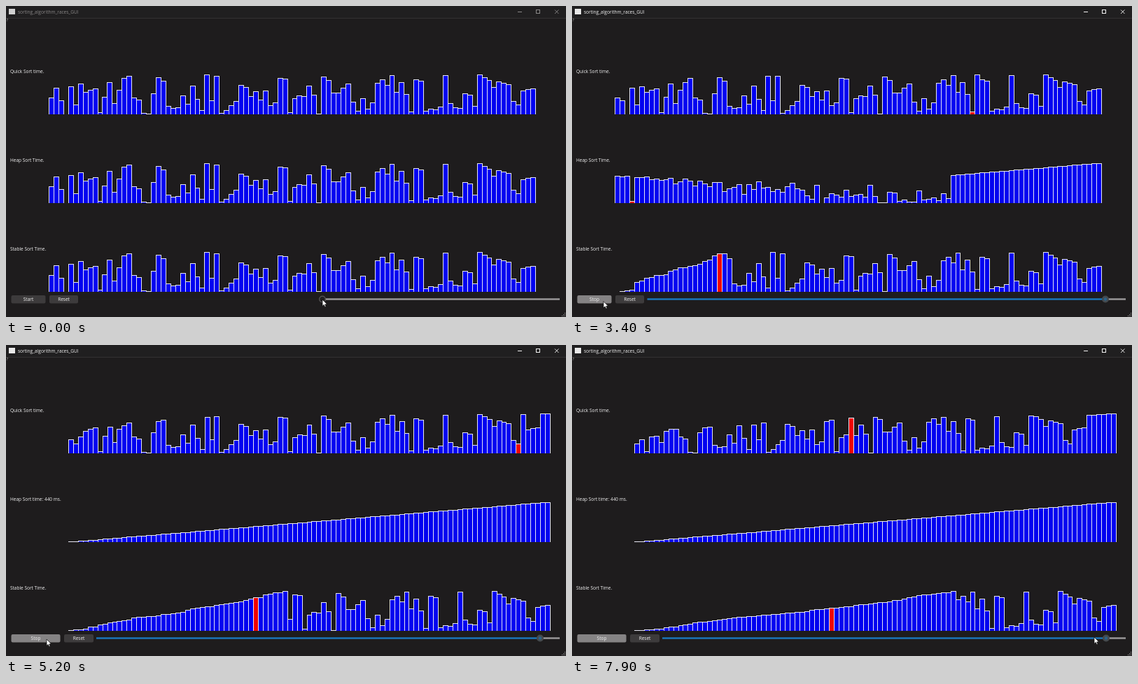
These frames come from a looping animation (800x445 px, 8 s). An HTML page with a canvas:

```html
<!DOCTYPE html>
<html lang="en">
<head>
<meta charset="utf-8">
<title>sorting_algorithm_races_GUI</title>
<style>
html, body { margin: 0; width: 100%; height: 100%; overflow: hidden; background: #1e1c1d; }
canvas { display: block; }
</style>
</head>
<body>
<canvas id="stage" width="800" height="445"></canvas>
<script>
const ctx = document.getElementById('stage').getContext('2d');
const LOOP = 8000, TICK = 100, PITCH = 6.95, UNIT = 0.58;
const START = 2800, HEAP_END = 4150, RELAYOUT = 4300;
const FONT = '6.5px "Open Sans", "Noto Sans", sans-serif';

// Rough bar heights; their ranks give a permutation of 0..99.
const rough = [
  24, 39, 20, 0, 40, 14, 45, 33, 35, 37, 3, 26, 47, 16, 35.5, 52, 55, 25, 21, 2,
  1, 31, 54, 48, 12, 9, 10, 28, 15, 41, 22, 6, 57.5, 20, 55, 1.5, 6, 12, 19, 43,
  39.5, 26, 33, 21.5, 34, 13, 17, 52, 51, 3.5, 23, 28, 27, 41, 29, .5, 54, 49, 31, 32,
  38, 44, 18, 5, 22.5, 8, 17, 45, 50, 42, 56, 32, 46.5, 30, 4, 50.5, 48, 5, 7, 6,
  11, 56, 16, 9, 8, 30, 29, 11, 57, 52, 49.5, 39, 47, 46, 43.5, 19, 14.5, 34.5, 36.5, 37.5
];
const N = rough.length;
const values = [];
rough.map((h, i) => [h, i]).sort((p, q) => p[0] - q[0]).forEach((p, rank) => { values[p[1]] = rank; });

function swap(a, i, j) { [a[i], a[j]] = [a[j], a[i]]; }

function bubbleSteps() {
  const a = values.slice(), out = [];
  for (let end = N - 1; end > N - 10; end--) {
    for (let j = 0; j < end; j++) {
      out.push({ a: a.slice(), red: j });
      if (a[j] > a[j + 1]) swap(a, j, j + 1);
      out.push({ a: a.slice(), red: j });
    }
  }
  return out;
}

function insertionSteps() {
  const a = values.slice(), out = [];
  for (let i = 1; i < N; i++) {
    const v = a[i];
    let j = i - 1;
    for (; j >= 0 && a[j] > v; j--) {
      a[j + 1] = a[j];
      out.push({ a: a.slice(), red: j, i });
    }
    a[j + 1] = v;
    out.push({ a: a.slice(), red: j + 1, i });
  }
  return out;
}

function heapSteps() {
  const a = values.slice(), out = [];
  const exchange = (i, j) => { swap(a, i, j); out.push({ a: a.slice(), red: j }); };
  function sift(root, size) {
    for (;;) {
      let child = 2 * root + 1;
      if (child >= size) return;
      if (child + 1 < size && a[child + 1] > a[child]) child++;
      if (a[root] >= a[child]) return;
      exchange(root, child);
      root = child;
    }
  }
  for (let i = N / 2 - 1; i >= 0; i--) sift(i, N);
  for (let end = N - 1; end > 0; end--) { exchange(0, end); sift(0, end); }
  return out;
}

const bubble = bubbleSteps(), insertion = insertionSteps(), heap = heapSteps();
const idle = { a: values, red: -1 };
const sorted = { a: values.map((v, i) => i), red: -1 };
const at = (i, j) => insertion.findIndex(s => s.i === i && s.red === j);

const bubblePath = [[START, 0], [4200, 344], [5200, 581], [6300, 859], [7900, 1248]];
const insertPath = [[START, 0], [4200, at(35, 32)], [5200, at(45, 39)], [6300, at(55, 37)], [7900, at(66, 41)]];
const heapPath = [[START, 0], [HEAP_END, heap.length - 1]];
const sliderPath = [[200, 452], [1300, 762]];
const mouseX = [[0, 452], [200, 453], [1300, 761], [1600, 761], [2500, 43], [2800, 43], [4200, 48], [5200, 58], [5400, 64], [6200, 784], [6500, 784], [7500, 746]];
const mouseY = [[0, 420], [200, 420], [1300, 426], [1600, 426], [2500, 423], [2800, 423], [4200, 422], [5200, 421], [5400, 422], [6200, 425], [6500, 425], [7500, 418]];

function track(path, t, ease) {
  if (t <= path[0][0]) return path[0][1];
  for (let k = 1; k < path.length; k++) {
    const [t0, v0] = path[k - 1], [t1, v1] = path[k];
    if (t <= t1) {
      let u = (t - t0) / (t1 - t0);
      if (ease) u = u * u * (3 - 2 * u);
      return v0 + (v1 - v0) * u;
    }
  }
  return path[path.length - 1][1];
}

function pick(steps, path, t) {
  return t < START ? idle : steps[Math.min(steps.length - 1, Math.round(track(path, t)))];
}

function rect(x, y, w, h, color) {
  ctx.fillStyle = color;
  ctx.fillRect(x, y, w, h);
}

function text(str, x, y, color = '#f2f2f2', align = 'left') {
  ctx.font = FONT;
  ctx.textAlign = align;
  ctx.fillStyle = color;
  ctx.fillText(str, x, y);
}

function disc(x, y, r, color) {
  ctx.beginPath();
  ctx.arc(x, y, r, 0, 7);
  ctx.fillStyle = color;
  ctx.fill();
}

function line(points, color, width) {
  ctx.beginPath();
  points.forEach(p => ctx.lineTo(p[0], p[1]));
  ctx.strokeStyle = color;
  ctx.lineWidth = width;
  ctx.stroke();
}

function bars(state, left, base) {
  state.a.forEach((v, i) => {
    if (!v) return;
    const x = Math.round(left + i * PITCH), next = Math.round(left + (i + 1) * PITCH);
    const h = Math.max(1, Math.round(v * UNIT));
    rect(x, base - h, next - x + 1, h, '#e6e6f2');
    rect(x + 1, base - h + 1, next - x - 1, h - 1, i === state.red ? '#f00000' : '#0000f0');
  });
}

function titleBar(active) {
  const ink = active ? '#f4f4f4' : '#8a8888';
  rect(0, 0, 800, 17, '#201f20');
  rect(0, 17, 800, 1, '#343233');
  rect(4, 4, 9, 8, active ? '#e8e8e8' : '#d0d0d0');
  text('sorting_algorithm_races_GUI', 17, 10.7, ink);
  line([[731, 8.5], [737, 8.5]], ink, 1);
  ctx.strokeRect(757.5, 5.5, 5, 5);
  line([[784, 5.5], [789.5, 11]], ink, .9);
  line([[789.5, 5.5], [784, 11]], ink, .9);
}

function button(label, x, w, fill, ink) {
  ctx.beginPath();
  ctx.roundRect(x, 414, w, 11.5, 2);
  ctx.fillStyle = fill;
  ctx.fill();
  text(label, x + w / 2, 422.3, ink, 'center');
}

function slider(left, x, active) {
  rect(left, 418.3, x - left, 2.4, active ? '#1a78bd' : '#201e1f');
  rect(x, 418.3, 791 - x, 2.4, '#9c9a9b');
  disc(x, 419.5, 5, active ? '#454a4e' : '#555354');
  disc(x, 419.5, active ? 2.2 : 3.6, active ? '#2b6288' : '#201e1f');
}

function grip() {
  for (let r = 0; r < 3; r++)
    for (let c = 0; c <= r; c++) rect(798 - c * 2, 439 + r * 2, 1, 1, '#a0a0a0');
}

function cursor(x, y) {
  const shape = [[0, 0], [0, 9.4], [2.2, 7.4], [3.7, 10.7], [5.2, 10], [3.8, 6.9], [6.7, 6.7]];
  ctx.beginPath();
  shape.forEach(p => ctx.lineTo(x + p[0], y + p[1]));
  ctx.closePath();
  ctx.fillStyle = '#fff';
  ctx.fill();
  ctx.strokeStyle = '#000';
  ctx.lineWidth = .7;
  ctx.stroke();
}

function heapLabel(t, wide) {
  if (t < HEAP_END) return text('Heap Sort Time.', 6, 223);
  ctx.save();
  ctx.beginPath();
  ctx.rect(0, 210, wide ? 82 : 57.8, 20);
  ctx.clip();
  text('Heap Sort time: 440 ms.', 6, 223);
  ctx.restore();
}

function draw(t) {
  const active = t >= 200, running = t >= START, wide = t >= RELAYOUT;
  const left = wide ? 82 : 61;
  rect(0, 0, 800, 445, '#1e1c1d');
  titleBar(active);
  ctx.font = '4.5px "Open Sans", sans-serif';
  ctx.textAlign = 'left';
  ctx.fillStyle = '#d0d0d0';
  ctx.fillText('?', 1, 22);

  text('Quick Sort time.', 6, 95.5);
  heapLabel(t, wide);
  text('Stable Sort Time.', 6, 350);
  bars(pick(bubble, bubblePath, t), left, 155);
  bars(t >= HEAP_END ? sorted : pick(heap, heapPath, t), left, 282);
  bars(pick(insertion, insertPath, t), left, 409);

  const pressed = t >= 2600 && !running;
  const fill = running ? '#858384' : pressed ? '#232122' : '#3d3b3c';
  button(running ? 'Stop' : 'Start', 7.5, wide ? 70 : 49, fill, pressed ? '#858384' : '#f2f2f2');
  button('Reset', wide ? 83 : 62, wide ? 42 : 41, '#3d3b3c', '#f2f2f2');
  slider(wide ? 129 : 107.5, wide ? 763 : track(sliderPath, t, true), active);
  grip();
  cursor(track(mouseX, t, true), track(mouseY, t, true));
}

const begin = performance.now();
function frame() {
  const t = (performance.now() - begin) % LOOP;
  draw(Math.floor(t / TICK) * TICK);
  requestAnimationFrame(frame);
}
frame();
</script>
</body>
</html>
```
